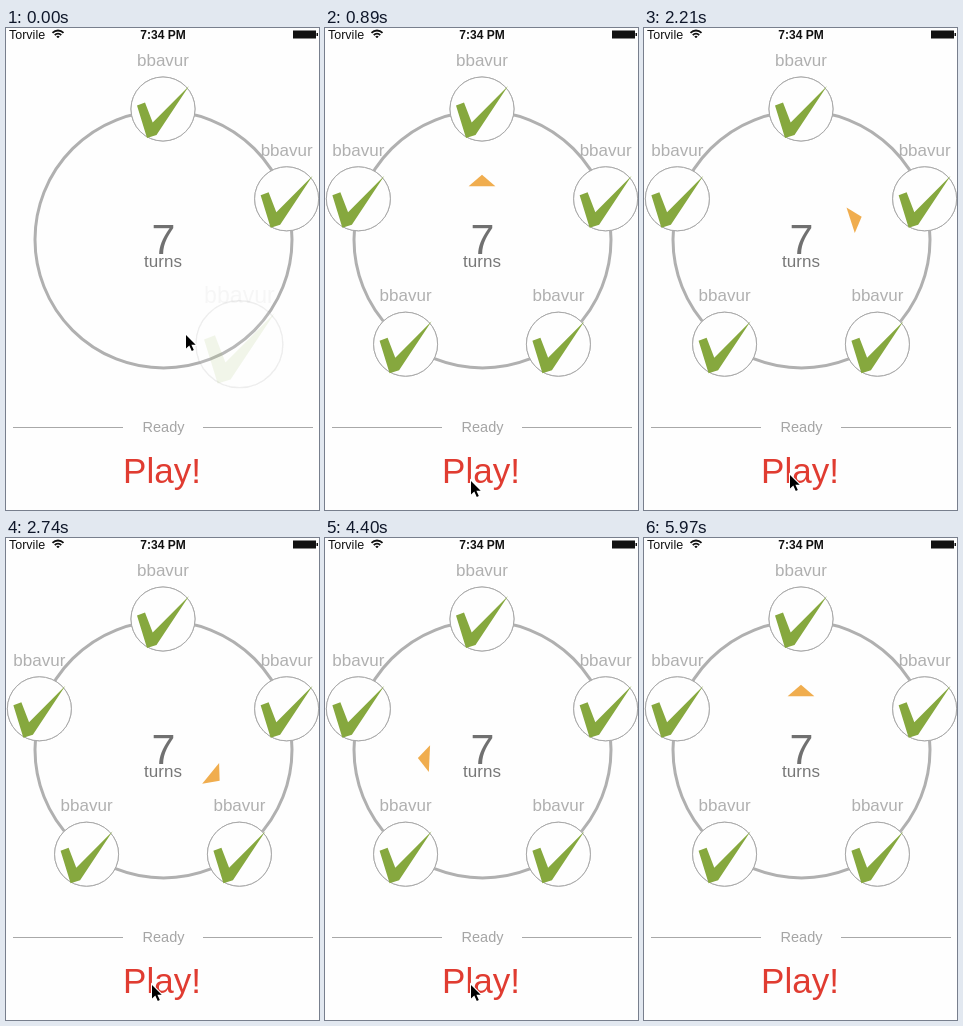
Write an HTML page with a canvas that moves like this. It is 313x482 px and loops after 6.2 s.

```html
<!DOCTYPE html>
<html lang="en">
<head>
<meta charset="utf-8">
<title>Turn wheel</title>
<style>
  html, body { margin: 0; width: 100%; height: 100%; overflow: hidden; background: #fefefe; }
  canvas { display: block; }
</style>
</head>
<body>
<canvas id="stage" width="313" height="482"></canvas>
<script>
const ctx = document.getElementById('stage').getContext('2d');
const FONT = '"Liberation Sans", Arial, sans-serif';
const PAPER = '#fefefe', GREY = '#b0b0b0', LINE = '#a8a8a8', INK = '#111';
const LOOP = 6200, TAU = Math.PI * 2;
const CX = 157, CY = 211;
const PLAYER = 'bbavur', PLAYERS = 5, STEP = TAU / PLAYERS;

const ARRIVAL = 250;                            // time for one player to appear
const TURNS = [1535, 2375, 3280, 4040, 5180];   // button releases, each starting a turn
const PRESS = 100;                              // the button is held this long before

const clamp = v => Math.min(1, Math.max(0, v));
const mix = (a, b, k) => a + (b - a) * k;
const smooth = k => k * k * (3 - 2 * k);
const span = (t, from, to) => clamp((t - from) / (to - from));

// cubic-bezier(0, 0, .58, 1), solved by bisection
function easeOut(x) {
  let lo = 0, hi = 1;
  for (let i = 0; i < 20; i++) {
    const s = (lo + hi) / 2;
    if (1.74 * s * s - .74 * s ** 3 < x) lo = s; else hi = s;
  }
  return smooth(x < 1 ? lo : 1);
}

function text(str, x, y, size, color, align = 'center', weight = '') {
  ctx.font = `${weight} ${size}px ${FONT}`;
  ctx.textAlign = align;
  ctx.fillStyle = color;
  ctx.fillText(str, x, y);
}

function rect(x, y, w, h, color) {
  ctx.fillStyle = color;
  ctx.fillRect(x, y, w, h);
}

function polygon(points, color) {
  ctx.beginPath();
  points.forEach(([x, y]) => ctx.lineTo(x, y));
  ctx.closePath();
  ctx.fillStyle = color;
  ctx.fill();
}

function arc(x, y, r, width, color, from = 0, to = TAU) {
  ctx.beginPath();
  ctx.arc(x, y, r, from, to);
  ctx.lineWidth = width;
  ctx.strokeStyle = color;
  ctx.stroke();
}

// Runs a drawing in its own frame of reference
function at(x, y, { scale = 1, turn = 0, alpha = 1 }, drawing) {
  ctx.save();
  ctx.translate(x, y);
  ctx.rotate(turn);
  ctx.scale(scale, scale);
  ctx.globalAlpha = alpha;
  drawing();
  ctx.restore();
}

function statusBar() {
  text('Torvile', 3, 11, 12.5, INK, 'left');
  text('7:34 PM', CX, 10.5, 12, INK, 'center', 'bold');
  for (const r of [1.5, 4.6, 7.8]) arc(52, 10.3, r, 1.8, INK, -TAU * 3 / 8, -TAU / 8);
  rect(287, 2.5, 23, 8, INK);
  rect(310.5, 5, 1.5, 3, INK);
}

function tick() {
  polygon([[-26, -3.5], [-18, -6.5], [-10.3, 13.5], [26, -23], [-6.5, 26], [-16, 29]], '#86a83e');
}

function player(i, t) {
  const start = (i - 2) * ARRIVAL - 25;
  const alpha = span(t, start, start + ARRIVAL), scale = mix(1.4, 1, alpha);
  const x = CX + 130 * Math.sin(i * STEP), y = CY - 130 * Math.cos(i * STEP);
  at(x, y, { scale, alpha }, () => {
    arc(0, 0, 32, 1, LINE);
    ctx.fillStyle = PAPER;
    ctx.fill();
    arc(0, 0, 32, 1, LINE);
    tick();
  });
  at(x, y - 48, { scale, alpha }, () => text(PLAYER, 0, 5, 17, GREY));
}

// The heading settles sooner than the travel along the circle
function arrow(t) {
  const angle = time => STEP * TURNS.reduce((sum, s) => sum + easeOut(span(t, s, s + time)), 0);
  const travel = angle(800);
  at(CX + 59 * Math.sin(travel), CY + .5 - 59 * Math.cos(travel),
    { turn: angle(600), alpha: span(t, 700, 850) },
    () => polygon([[0, -5.8], [13.4, 5.8], [-13.4, 5.8]], '#f0ad4e'));
}

function button(t) {
  const release = TURNS.findLast(s => t >= s - PRESS) ?? -LOOP;
  const alpha = mix(.2, 1, smooth(span(t, release, release + 215)));
  at(156, 455, { alpha }, () => text('Play!', 0, 0, 35, '#e03c31'));
}

// Glides to the button, settles on it, slips down and leaves
function pointer(t) {
  if (t > 5620) return;
  const move = (from, to) => smooth(span(t, from, to));
  const glide = move(180, 680);
  const x = 180 - 34 * glide;
  const y = 306 + 157 * glide - 11 * move(800, 890) - 6 * move(890, 1240) + 11 * move(5330, 5550);
  at(x, y, {}, () => {
    polygon([[0, 1], [0, 14.5], [3.3, 11.5], [5.8, 17], [7.8, 16], [5.4, 10.7], [9.7, 10.7]], '#000');
    ctx.lineWidth = 2;
    ctx.strokeStyle = '#fff';
    ctx.stroke();
    ctx.fill();
  });
}

function draw(t) {
  rect(0, 0, 313, 482, PAPER);
  statusBar();
  arc(157.5, 211.5, 128.5, 3, GREY);
  for (let i = 0; i < PLAYERS; i++) player(i, t);
  text('7', 157.5, 225.5, 43, '#707070');
  text('turns', CX, 239, 17, '#777');
  for (const x of [7, 197]) rect(x, 399, 110, 1, LINE);
  text('Ready', 157.5, 403.5, 14.5, '#a5a5a5');
  button(t);
  arrow(t);
  pointer(t);
}

const begin = performance.now();
function frame() {
  draw((performance.now() - begin) % LOOP);
  requestAnimationFrame(frame);
}
frame();
</script>
</body>
</html>
```
